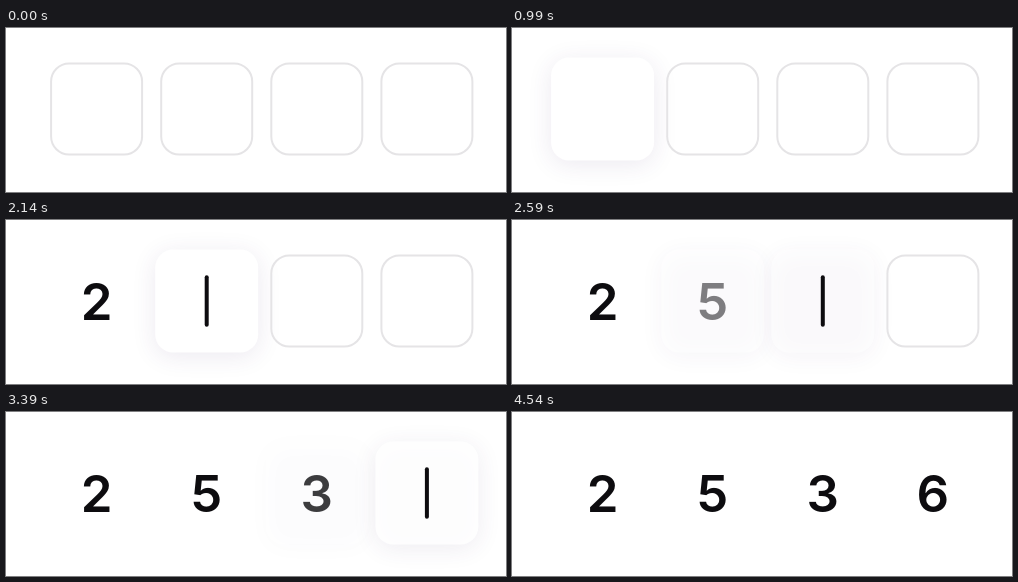
An HTML page with a canvas for the animation above (4.89 s loop, 500 by 164 pixels).

```html
<!DOCTYPE html>
<html lang="en">
<head>
<meta charset="utf-8">
<title>Code entry</title>
<style>
  html, body { margin: 0; width: 100%; height: 100%; overflow: hidden; background: #fff; }
  canvas { display: block; width: 500px; height: 164px; }
</style>
</head>
<body>
<canvas id="stage"></canvas>
<script>
const WIDTH = 500, HEIGHT = 164, LOOP = 4890, TICK = 50, TICK_OFFSET = 40;
const FIRST_X = 90.6, PITCH = 110.1, MID_Y = 81;
const INK = '#0d0c0f';

// A cell is focused at `focus` and filled at `typed`; `blink` restarts its caret.
const cells = [
  { digit: '2', focus: 290, typed: 1890, fade: 250 },
  { digit: '5', focus: 1890, typed: 2540, fade: 250 },
  { digit: '3', focus: 2540, typed: 3240, fade: 300, blink: 3140 },
  { digit: '6', focus: 3240, typed: 3990, fade: 250 }
];

const canvas = document.getElementById('stage');
const ctx = canvas.getContext('2d');
const ratio = window.devicePixelRatio || 1;
canvas.width = Math.round(WIDTH * ratio);
canvas.height = Math.round(HEIGHT * ratio);

const clamp = v => Math.max(0, Math.min(1, v));
const easeOut = p => 1 - (1 - p) ** 2;
const reveal = (t, start, length) =>
  t < start ? 0 : easeOut(clamp((t - start + 40) / (length + 40)));

function caretAlpha(age) {
  const phase = age % 1100;
  if (age >= 1100 && phase < 520) return 1;
  return phase < 700 ? clamp((680 - phase) / 160) : clamp((phase - 960) / 140);
}

function roundedSquare(x, size, radius) {
  ctx.beginPath();
  ctx.roundRect(x - size / 2, MID_Y - size / 2, size, size, radius);
}

function drawCard(x, alpha) {
  if (alpha <= 0) return;
  ctx.save();
  ctx.globalAlpha = alpha;
  ctx.shadowColor = 'rgba(72, 40, 105, 0.10)';
  ctx.shadowBlur = 24 * ratio;
  ctx.shadowOffsetY = 4 * ratio;
  ctx.fillStyle = '#fff';
  roundedSquare(x, 103, 18);
  ctx.fill();
  ctx.restore();
}

function drawOutline(x) {
  ctx.strokeStyle = '#e5e4e6';
  ctx.lineWidth = 2;
  roundedSquare(x, 91, 18);
  ctx.stroke();
}

function drawCaret(x, alpha) {
  ctx.globalAlpha = alpha;
  ctx.fillStyle = INK;
  ctx.beginPath();
  ctx.roundRect(x - 2, MID_Y - 25.7, 4, 51.4, 2);
  ctx.fill();
  ctx.globalAlpha = 1;
}

function drawDigit(digit, x, alpha) {
  ctx.globalAlpha = alpha;
  ctx.fillStyle = INK;
  ctx.font = '600 51px Inter, sans-serif';
  ctx.textAlign = 'center';
  ctx.fillText(digit, x, 100);
  ctx.globalAlpha = 1;
}

function draw(t) {
  ctx.setTransform(ratio, 0, 0, ratio, 0, 0);
  ctx.fillStyle = '#fff';
  ctx.fillRect(0, 0, WIDTH, HEIGHT);

  const centre = i => FIRST_X + i * PITCH;
  cells.forEach((cell, i) => {
    const shown = reveal(t, cell.focus, 250);
    drawCard(centre(i), shown * (1 - reveal(t, cell.typed, cell.fade)));
  });
  cells.forEach((cell, i) => {
    const x = centre(i);
    if (t < cell.focus) {
      drawOutline(x);
    } else if (t < cell.typed) {
      const start = t >= cell.blink ? cell.blink : cell.focus;
      drawCaret(x, caretAlpha(t - start));
    } else {
      drawDigit(cell.digit, x, reveal(t, cell.typed, cell.fade));
    }
  });
}

const origin = performance.now();
function frame() {
  const t = (performance.now() - origin) % LOOP;
  draw(Math.floor((t - TICK_OFFSET) / TICK) * TICK + TICK_OFFSET);
  requestAnimationFrame(frame);
}
frame();
</script>
</body>
</html>
```
